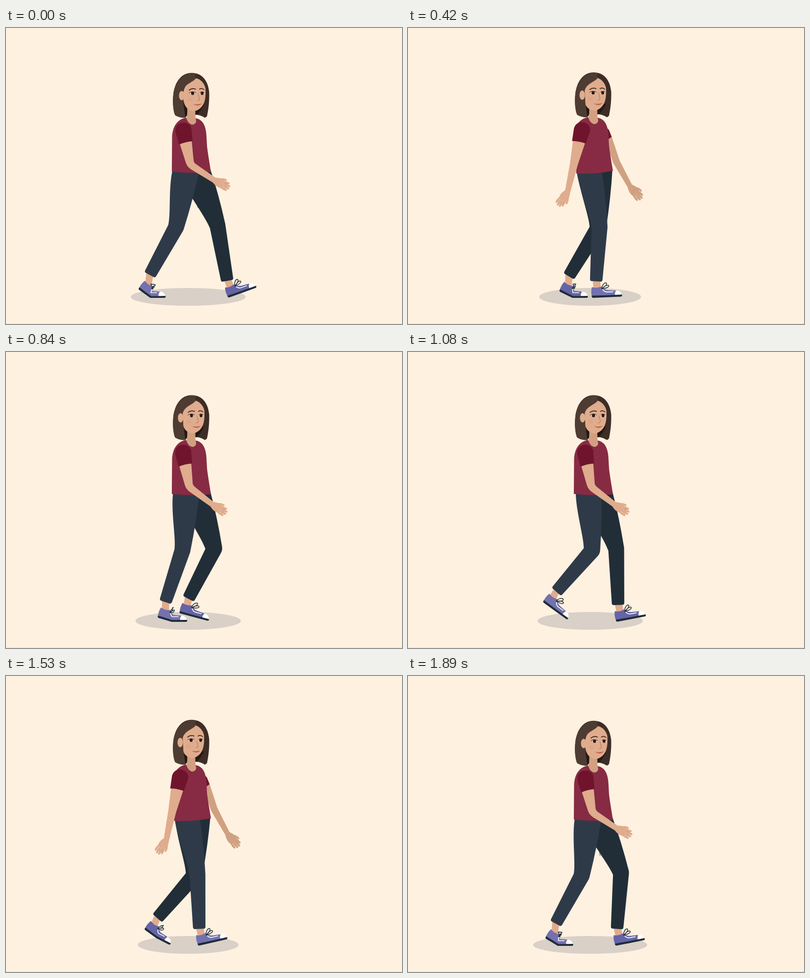
Recreate the animation shown at these times as an HTML page with a canvas. Size 800 by 600 pixels, loop 1.92 s.

```html
<!DOCTYPE html>
<html lang="en">
<head>
<meta charset="utf-8">
<title>Walk cycle</title>
<style>
html, body { margin: 0; width: 100%; height: 100%; overflow: hidden; background: #fff1e0; }
canvas { display: block; width: 800px; height: 600px; }
</style>
</head>
<body>
<canvas id="stage" width="800" height="600"></canvas>
<script>
const ctx = document.getElementById('stage').getContext('2d');
const CYCLE = 960, HALF = CYCLE / 2, STEP = 30, RAD = Math.PI / 180;
const GROUND = 547, BALL = 30, SOLE = 61;
const INK = '#1f2c37', SKIN = '#dfac8d', SKIN_FAR = '#d0a181';
const SHIRT = '#862b43', SLEEVE = '#70142e';

// back and reach: heel x at lift-off and at contact; swing and roll: easing powers
const nearLeg = { hip: 367, thigh: 122, shin: 109.5, back: 267, reach: 411, swing: 2.4, roll: 1.1,
  pants: '#2f3a49', shoe: '#7371af' };
const farLeg = { hip: 388, thigh: 123, shin: 112.8, back: 278, reach: 449, swing: 3, roll: 1.3,
  pants: '#212e38', shoe: '#6564a6' };

const lerp = (a, b, u) => a + (b - a) * u;
const smooth = u => u * u * (3 - 2 * u);
const add = (p, v, s) => [p[0] + v[0] * s, p[1] + v[1] * s];
const mix = (p, q, u) => [lerp(p[0], q[0], u), lerp(p[1], q[1], u)];
const unit = (p, q) => {
  const x = q[0] - p[0], y = q[1] - p[1], l = Math.hypot(x, y) || 1;
  return [x / l, y / l];
};
const turn = (x, y, deg) => {
  const c = Math.cos(deg * RAD), s = Math.sin(deg * RAD);
  return [x * c - y * s, x * s + y * c];
};
const down = deg => [Math.sin(deg * RAD), Math.cos(deg * RAD)];
const front = d => [d[1], -d[0]];

function fill(color, d) {
  ctx.fillStyle = color;
  ctx.fill(new Path2D(d));
}
function line(color, width, d) {
  ctx.strokeStyle = color;
  ctx.lineWidth = width;
  ctx.stroke(new Path2D(d));
}
function ellipse(color, x, y, rx, ry) {
  ctx.fillStyle = color;
  ctx.beginPath();
  ctx.ellipse(x, y, rx, ry, 0, 0, Math.PI * 2);
  ctx.fill();
}

// Heel angle: push off, lift behind, strike, roll flat
function heelAngle(p) {
  if (p < 120) return 36;
  if (p < 250) return lerp(36, 47, (p - 120) / 130);
  if (p < HALF) return lerp(47, -20, (p - 250) / 230);
  if (p < 740) return lerp(-20, 0, (p - HALF) / 260);
  return lerp(0, 36, (p - 740) / 220);
}

// The foot swings through half the cycle and rolls over the ground in the other half
function footPose(leg, p) {
  const x = p < HALF
    ? lerp(leg.back, leg.reach, (p / HALF) ** leg.swing)
    : lerp(leg.reach, leg.back, (p / HALF - 1) ** leg.roll);
  const heel = heelAngle(p);
  const planted = p > 740 ? 1 : Math.max(0, 1 - p / 120);
  const toe = heel * (1 - planted);
  const lift = p < 450 ? 14 * Math.sin(Math.PI * p / 450) ** 4 : 0;
  const rise = (len, a) => len * Math.sin(Math.max(0, a) * RAD);
  const y = GROUND - lift - rise(BALL, heel) - rise(SOLE - BALL, toe);
  const flex = Math.max(0, heel - toe) / 36;
  const hem = add([x, y], turn(10 - 8 * flex, -33 - 4 * flex, heel), 1);
  return { x, y, heel, toe, hem };
}

function foot({ x, y, heel, toe, hem }, color) {
  const base = turn(BALL, 0, heel);
  const at = (px, py) => {
    const back = px <= BALL;
    const p = turn(back ? px : px - BALL, py, back ? heel : toe);
    return add([x, y], back ? p : add(base, p, 1), 1);
  };
  // Maps number pairs of a path into the bent foot
  const bend = d => d.replace(/(-?[\d.]+),(-?[\d.]+)/g, (m, a, b) => at(+a, +b).join(','));

  const l = at(4, -19), r = at(19, -18);
  fill(SKIN, `M${hem[0] - 7},${hem[1] - 3} L${l} L${r} L${hem[0] + 8},${hem[1] - 3}Z`);
  fill(color, bend('M0,-3 Q-2,-13 1,-22 Q10,-18 20,-22 Q25,-15 34,-14 L46,-13 Q59,-12 60,-3 L30,-3Z'));
  fill('#fff', bend('M47,-3 Q46,-9 50,-13 Q59,-12 61,-3Z'));
  fill(INK, bend('M0,-4.5 L30,-4 L61,-4 Q62,-1 59,0 L30,0 L2,0 Q-1,-1 0,-4.5Z'));
  line('#fff', 1.7, bend('M22,-17 Q25,-11 31,-10.5 L43,-10.5'));
  line(INK, 1.5, bend('M21,-17 C21,-26 29,-32 31,-28 C32,-25 25,-20 21,-17 C28,-25 36,-26 35,-22 C34,-19 27,-18 21,-17'));
}

// Knee of a two-bone leg that always bends forward
function kneeOf(hip, hem, a, b) {
  const d = Math.min(a + b, Math.hypot(hem[0] - hip[0], hem[1] - hip[1]));
  const bend = Math.acos(Math.min(1, (a * a + d * d - b * b) / (2 * a * d)));
  const dir = Math.atan2(hem[0] - hip[0], hem[1] - hip[1]) + bend;
  return add(hip, down(dir / RAD), a);
}

function drawLeg(leg, p, left, right, bob) {
  const pose = footPose(leg, p), hem = pose.hem;
  const knee = kneeOf([leg.hip, 285 + bob], hem, leg.thigh, leg.shin);
  foot(pose, leg.shoe);

  const tl = [left + (knee[0] - leg.hip) * 0.08, 287 + bob], tr = [right, 287 + bob];
  const thigh = unit(mix(tl, tr, 0.5), knee), shin = unit(knee, hem);
  const mid = unit([0, 0], add(thigh, shin, 1));
  const half = 16 / Math.max(0.8, mid[0] * shin[0] + mid[1] * shin[1]);
  const n = front(mid), m = front(shin);
  const kb = add(knee, n, -half), kf = add(knee, n, half);
  const hb = add(hem, m, -12.5), hf = add(hem, m, 12.5);
  const bulge = add(mix(tr, kf, 0.45), n, 3);

  ctx.fillStyle = leg.pants;
  ctx.beginPath();
  ctx.moveTo(...tl);
  ctx.bezierCurveTo(...add(mix(tl, kb, 0.35), n, -6), ...add(mix(tl, kb, 0.8), n, 4), ...kb);
  ctx.arcTo(...hb, ...hf, 4);
  ctx.arcTo(...hf, ...kf, 4);
  ctx.arcTo(...kf, ...mix(kf, bulge, 0.5), 20);
  ctx.quadraticCurveTo(...bulge, ...tr);
  ctx.closePath();
  ctx.fill();
}

function hand(p, angle, skin) {
  ctx.save();
  ctx.translate(...p);
  ctx.rotate(-angle * RAD);
  fill(skin, 'M-5,-2 C-10,8 -10,15 -7,20 L7,20 C11,13 9,6 5,-2Z');
  line(skin, 4, 'M-6,17 Q-8,24 -7,29 M-2,18 L-2,32 M2.5,18 L3,32 M6,17 L7.5,28');
  line(skin, 4, 'M5,7 Q11,13 11,20');
  line('#c08d71', 0.7, 'M-4,22 L-4.5,28 M0.3,22 L0.4,29 M4.6,21 L5,27');
  ctx.restore();
}

function arm(s, [upper, lower, palm], [w0, w1, w2], skin, sleeve) {
  const a = down(upper), b = down(lower);
  const elbow = add(s, a, 76), wrist = add(elbow, b, 58), cuff = add(s, a, 24);
  const na = front(a), nb = front(b), ne = front(unit([0, 0], add(a, b, 1)));
  const top = add(cuff, na, w0);

  hand(wrist, palm, skin);
  ctx.fillStyle = skin;
  ctx.beginPath();
  ctx.moveTo(...add(cuff, na, -w0));
  ctx.arcTo(...add(elbow, ne, -w1), ...add(wrist, nb, -w2), 26);
  ctx.lineTo(...add(wrist, nb, -w2));
  ctx.lineTo(...add(wrist, nb, w2));
  ctx.arcTo(...add(elbow, ne, w1), ...top, 10);
  ctx.lineTo(...top);
  ctx.fill();

  ctx.save();
  ctx.translate(...s);
  ctx.rotate(-upper * RAD);
  fill(SLEEVE, sleeve);
  ctx.restore();
}

function torso(back) {
  const x = 335 + 5 * back ** 3, y = 291 + 5 * back, r = 292 - 1.5 * back;
  fill(SHIRT, `M363,182 C346,185 336,200 335.5,222 L${x},${y} Q378,${296 + 2 * back} 414,${r}
    C411,272 407,250 406,238 C405,218 405,208 401,198 C397,188 390,184 383,183Z`);
}

function head(look) {
  fill('#3d2d26', `M375,91 C355,91 341,108 338,135 C336,155 339,172 342,177 Q350,182 362,182
    L367,176 L386,176 Q394,177 402,182 L406,179 C409,165 411,150 410.5,130 C408,105 395,91 375,91Z`);
  fill('#251814', 'M358,150 L400,155 Q395,166 386,176 L367,176 L362,180Z');
  fill('#d2a081', 'M366,155 L382,160 L383,184 Q387,193 377,196 Q368,195 364,182 Q367,180 366,155Z');

  ctx.save();
  ctx.translate(look, 0);
  fill(SKIN, `M385,102 C372,106 360,115 358,132 C357,150 361,160 370,166 C378,171 388,168 395,160
    C402,152 404,140 403,122 C400,110 392,104 385,102Z`);
  ctx.restore();

  fill('#4e3c32', `M385,93 C365,87 342,103 338,135 C336,155 339,172 342,177 Q350,182 362,182
    C362,172 358,160 358,146 L357,128 C361,112 380,110 384,101 Q379,97 385,93Z`);

  ctx.save();
  ctx.translate(look, 0);
  ellipse(SKIN, 355, 137, 5.5, 9.5);
  ellipse('rgba(226,140,120,.25)', 371, 145, 5, 4);
  for (const [x, r] of [[377, 3.2], [396.3, 2.9]]) {
    ellipse('#ecd2c0', x, 132.5, r + 1.8, 2.8);
    ellipse('#281b18', x, 132.5, r, 3.3);
  }
  line('#281b18', 1, 'M370,131.5 Q376,127 383,131 M392,131 Q396,127.5 400.5,131');
  line('#3b2922', 1.7, 'M370,126 Q376,121 383,124 M391,124 Q396,121 400,125');
  line('#b77b62', 1.1, 'M388,133 Q390,140 391,145 Q390,148 386,147');
  fill('#bd5f4d', 'M378,154 Q387,156 396,153 Q388,161 378,154Z');
  ctx.restore();
}

function draw(t) {
  const wave = Math.cos(t / CYCLE * 2 * Math.PI);
  const bob = 7.2 * (wave * wave - 1);
  const back = smooth((1 - wave) / 2);
  const look = -3 * (1 - Math.max(0, wave) ** 4);
  const swing = (from, to) => from.map((v, i) => lerp(v, to[i], back));

  ctx.fillStyle = '#fff1e0';
  ctx.fillRect(0, 0, 800, 600);
  ctx.fillStyle = '#e6dfd5';
  ctx.fillRect(0, 599, 800, 1);
  ellipse('#d9d0c7', 368, 545, 97 + (wave > 0 ? 19 : 7) * wave * wave, 18);

  arm([397, 200 + bob], swing([-2, 1, 0], [18.5, 29, 41]), [7, 7, 5], SKIN_FAR,
    'M-8,27 L-8,2 Q2,0 6,10 L7,25 Q0,28 -8,27Z');
  drawLeg(farLeg, (t + HALF) % CYCLE, 342, 413, bob);
  drawLeg(nearLeg, t, 338.5, 391, bob);

  ctx.save();
  ctx.translate(0, bob);
  torso(back);
  head(look);
  ctx.restore();

  arm([lerp(357, 352, back), 203 + bob], swing([12, 57, 63], [-13, -13, -35]), [13, 8, 5.5], SKIN,
    'M-14,31 L-16,5 C-15,-6 -8,-11 0,-11 C10,-11 17,-5 17,4 L14,30 Q0,28 -14,31Z');
}

ctx.lineCap = ctx.lineJoin = 'round';
const start = performance.now();
function tick() {
  const t = Math.max(0, performance.now() - start);
  draw(Math.floor(t / STEP) * STEP % CYCLE);
  requestAnimationFrame(tick);
}
draw(0);
requestAnimationFrame(tick);
</script>
</body>
</html>
```
